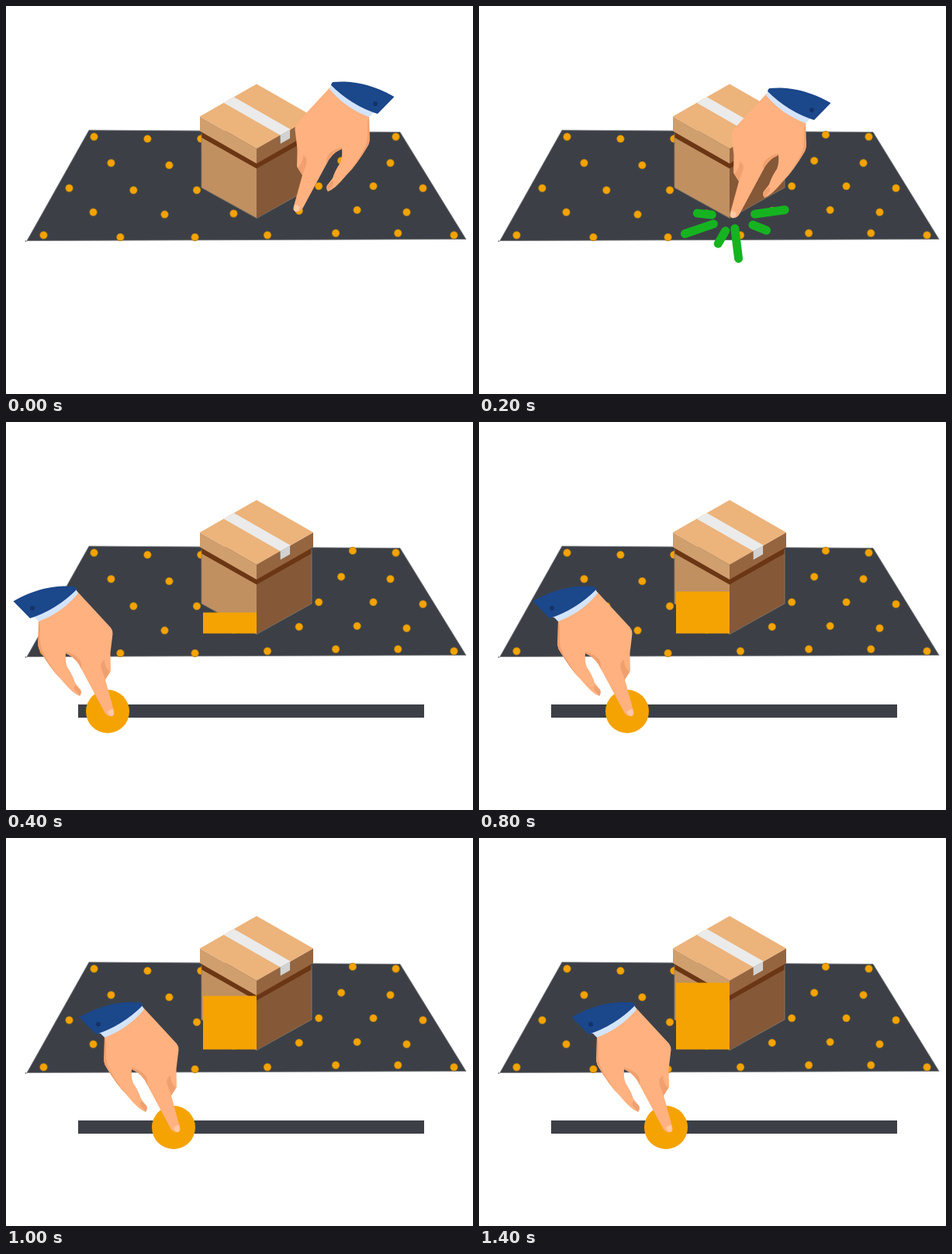
Animation of 602 by 500 pixels, one loop 1.6 s. Source, as an HTML page with a canvas:

```html
<!DOCTYPE html>
<html lang="en">
<head>
<meta charset="utf-8">
<title>Box on a mat</title>
<style>
html, body { margin: 0; width: 100%; height: 100%; overflow: hidden; background: #fff; }
canvas { display: block; }
</style>
</head>
<body>
<canvas id="stage" width="602" height="500"></canvas>
<script>
const ctx = document.getElementById('stage').getContext('2d');
const LOOP = 1600, DRAG_START = 400, DRAG_STEP = 200;
const SLATE = '#3c4046', ORANGE = '#f5a302', GREEN = '#16b321';
const FRONT = 323;

// Knob position at each step of the drag.
const knobs = [131, 166, 191, 216, 266, 241];

// Dot rows from back to front.
const rows = [
  { from: 113, to: 502, count: 7, bulge: 12 },
  { from: 135, to: 495, count: 6, bulge: 9 },
  { from: 81, to: 537, count: 7, bulge: 17 },
  { from: 112, to: 516, count: 6, bulge: 22 },
  { from: 48, to: 577, count: 7, bulge: 24 }
];

const hand = {
  skin: new Path2D(`M418.5 104 L375 151 Q372 155 372.5 159 L375.5 184 L375 207
    Q378 212 382 218 L371 258 Q369 263 373 265 Q380 267 384.5 257
    L413 204 Q419 190 433 184 Q434 195 431 202 Q424 212 421 222
    L414 231 Q412 235 415 239 Q424 236 437 220 Q453 203 466 181
    Q470 175 468.5 164 L468 142 L440 122 Z`),
  edge: new Path2D('M468 142 L468.5 164 Q470 175 466 181 Q453 203 441 216 Q457 195 464 179 Q467 170 466 150 Z'),
  crease: new Path2D('M383 192 Q383 202 376 208 L382 218 L386 207 Q389 200 387 196 Z'),
  web: new Path2D('M433 184 Q419 190 413 204 Q412 196 416 191 Q423 184 433 182 Z'),
  tip: new Path2D('M415 239 Q412 235 414 231 L421 225 Q424 230 419 234 Z'),
  nail: new Path2D('M372 256 Q370 263 373 265 Q378 265 379 259 Q376 256 372 256 Z'),
  cuff: new Path2D('M417 107 L420 101 Q444 119 480 136 L473 138 L468 143 Q438 132 417 107 Z'),
  sleeve: new Path2D('M419 102 Q420 98 422 98 C440 96 468 98 500.5 117 L479 139 Q445 128 419 102 Z')
};

function poly(color, ...pts) {
  ctx.beginPath();
  pts.forEach(([x, y]) => ctx.lineTo(x, y));
  ctx.closePath();
  ctx.fillStyle = color;
  ctx.fill();
}

function line(color, width, ...pts) {
  ctx.beginPath();
  pts.forEach(([x, y]) => ctx.lineTo(x, y));
  ctx.strokeStyle = color;
  ctx.lineWidth = width;
  ctx.stroke();
}

function disc(x, y, r, color) {
  ctx.beginPath();
  ctx.arc(x, y, r, 0, Math.PI * 2);
  ctx.fillStyle = color;
  ctx.fill();
}

function drawDots() {
  rows.forEach(({ from, to, count, bulge }, r) => {
    const rowY = 168.5 + 34.5 * r - 0.7 * r * r;
    for (let i = 0; i < count; i++) {
      const t = i / (count - 1);
      const wave = 3 * Math.sin(2 * Math.PI * t);
      const x = from + (to - from) * t + bulge * 4 * t * (1 - t) - wave + 0.5;
      disc(x, rowY + wave, 5.2, '#a5781c');
      disc(x, rowY + wave, 4.4, ORANGE);
    }
  });
}

function drawMat() {
  const corners = [[107, 160], [508, 162.5], [593, 300.5], [27, 302.5]];
  poly(SLATE, ...corners);
  line('#77797c', 0.8, ...corners, corners[0]);
  disc(25.5, 303, 1, '#77797c');
  drawDots();
}

// A slanted wall running from the front edge to the left (-1) or right (1).
function wall(side, width, rise, top, bottom, color) {
  const x = FRONT + side * width;
  poly(color, [FRONT, top], [x, top - rise], [x, bottom - rise], [FRONT, bottom]);
}

// A point on the lid: u runs to the back corner, v to the front one.
function lid(u, v) {
  return [250 + 73 * (u + v), 142.3 + 41.7 * (v - u)];
}

function strip(color, a, b) {
  poly(color, lid(a, 0), lid(b, 0), lid(b, 1), lid(a, 1));
}

function drawBox() {
  const shades = { '-1': ['#c09061', '#d09f6e'], '1': ['#855838', '#956540'] };
  for (const side of [-1, 1]) {
    const [body, rim] = shades[side];
    const x = FRONT + side * 71;
    wall(side, 71, 39, 200, 273, body);
    wall(side, 71, 40, 200, 209.5, '#6b3614');
    line('#8f7b69', 0.8, [x, 164], [x, 234], [FRONT, 273.5]);
    wall(side, 73, 41.7, 184, 203, rim);
  }
  strip('#ecb37b', 0, 1);
  strip('#ebebeb', 0.42, 0.6);
  const [x1, y1] = lid(0.42, 1), [x2, y2] = lid(0.59, 1);
  poly('#d2d2d2', [x1, y1], [x2, y2], [x2, y2 + 11], [x1, y1 + 11]);
}

function drawHand() {
  const fill = (part, color) => {
    ctx.fillStyle = color;
    ctx.fill(hand[part]);
  };
  fill('skin', '#ffb17f');
  for (const part of ['edge', 'crease', 'web', 'tip']) fill(part, '#f0a06f');
  fill('nail', '#ffc9a6');
  fill('cuff', '#d3e4fb');
  fill('sleeve', '#1b478b');
  disc(476, 126, 3, '#14336a');
}

// Long and short rays alternate around the fingertip.
function drawClick() {
  ctx.lineCap = 'round';
  [-8, 22, 83, 120, 161, 186].forEach((deg, i) => {
    const a = deg * Math.PI / 180;
    const near = 13 + 15 * Math.abs(Math.cos(a));
    const far = near + (i % 2 ? 19 : 39);
    const at = r => [328 + r * Math.cos(a), 272 + r * Math.sin(a)];
    line(GREEN, 11, at(near), at(far));
  });
  ctx.lineCap = 'butt';
}

function drawSlider(knob) {
  const drag = knob - knobs[0];
  const height = Math.round(27 + drag * (0.35 + 0.0017 * drag));
  ctx.fillStyle = ORANGE;
  ctx.fillRect(254, 272.5 - height, 69, height);
  ctx.fillStyle = SLATE;
  ctx.fillRect(93, 364, 446, 17);
  disc(knob, 373, 28, ORANGE);
}

function drawTap(ms) {
  const near = Math.min(Math.floor(ms / 100), 2) / 2;
  ctx.save();
  ctx.translate(Math.round(-47 * near), 8 * near);
  drawHand();
  ctx.restore();
  if (near === 1) drawClick();
}

function drawDrag(ms) {
  const knob = knobs[Math.floor((ms - DRAG_START) / DRAG_STEP)];
  drawSlider(knob);
  ctx.save();
  ctx.translate(knob + 379, 114);
  ctx.scale(-1, 1);
  drawHand();
  ctx.restore();
}

function draw(ms) {
  ctx.fillStyle = '#fff';
  ctx.fillRect(0, 0, 602, 500);
  drawMat();
  drawBox();
  if (ms < DRAG_START) drawTap(ms);
  else drawDrag(ms);
}

const start = performance.now();
function tick() {
  draw((performance.now() - start) % LOOP);
  requestAnimationFrame(tick);
}
tick();
</script>
</body>
</html>
```
